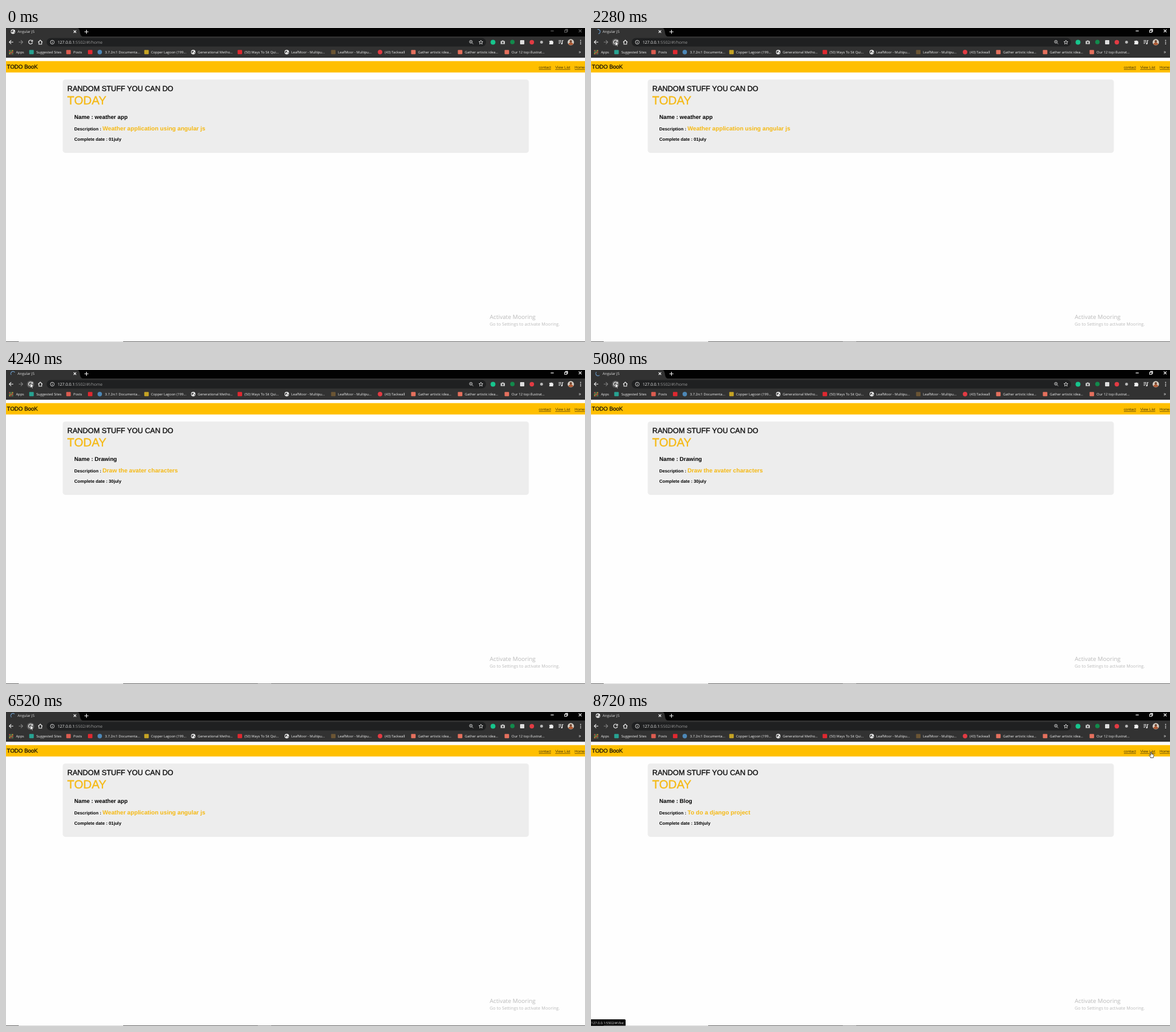
An HTML page for the animation above (8760 ms loop, 954 px wide and 518 px high).

```html
<!DOCTYPE html>
<html lang="en">
<head>
<meta charset="utf-8">
<style>
  html, body { margin: 0; width: 100%; height: 100%; overflow: hidden; background: #fefefe; }
  svg { display: block; width: 954px; height: 518px; }
  text { font-family: "Open Sans", "Noto Sans", sans-serif; text-rendering: geometricPrecision; white-space: pre; }
  .page text { font-family: "Liberation Sans", Arial, sans-serif; font-weight: bold; }
  .page .medium { font-weight: normal; stroke: currentColor; fill: currentColor; stroke-width: .35; }
  .page .link { font-weight: normal; font-size: 6.2px; fill: #40320a; text-decoration: underline .5px; }
  .line { fill: none; stroke: #eee; stroke-width: 1.1; }
</style>
</head>
<body>
<svg viewBox="0 0 954 518">
  <defs>
    <g id="globe">
      <circle r="3.7" fill="#eee"/>
      <path d="M-3-1 0-2.5 1-1-1 .4-1 2-2.6 1ZM1 .5 3 0 2 2.5Z" fill="#444"/>
    </g>
  </defs>

  <rect width="954" height="49" fill="#323232"/>
  <path d="M118 0Q121 0 122 8 123 14 127 14H954V0Z" fill="#020202"/>
  <rect x="67" y="16.5" width="724" height="14" rx="7" fill="#1f2021"/>
  <use id="favicon" href="#globe" x="11.5" y="6"/>
  <path id="spinner" class="line" d="M0-3.6A3.6 3.6 0 0 1 0 3.6" style="stroke:#6fa0cf"/>
  <text x="19" y="8.2" font-size="5.95" fill="#ddd">Angular JS</text>
  <path class="line" d="M111.5 4 115.5 8M115.5 4 111.5 8M132.5 3V9.5M129.2 6.2H135.8"/>
  <g id="controls" class="line"><path d="M897.5 4.9H902.5M943.7 2.5 948.3 7.1M948.3 2.5 943.7 7.1M920.5 3.7H924V7.2H920.5ZM922 3.5V2.4H925.4V5.8H924.2"/></g>

  <path class="line" d="M12 23.3H5.5M8.5 20.2 5.4 23.3 8.5 26.4"/>
  <path class="line" d="M21 23.3H27.5M24.5 20.2 27.6 23.3 24.5 26.4" style="stroke:#808080"/>
  <circle id="hover" cx="40.5" cy="23.4" r="6" fill="#5c5c5c"/>
  <path class="line" d="M43 21.2A3.2 3.2 0 1 0 43.6 24M43.8 19.8V22.3H41.2"/>
  <path class="line" d="M53 23.5 56.5 20 60 23.5M54.2 23V26.8H58.8V23"/>
  <g class="line" style="stroke-width:.8">
    <circle cx="76.3" cy="23.4" r="3.2"/><path d="M76.3 23V25.2M76.3 21.4V22.2"/>
    <circle cx="766" cy="22.7" r="2.3"/><path d="M767.7 24.4 769.8 26.5M765 22.7H767"/>
    <path d="M782.5 20 783.4 22.3 785.9 22.5 784 24.1 784.6 26.6 782.5 25.2 780.4 26.6 781 24.1 779.1 22.5 781.6 22.3Z"/>
  </g>
  <text x="85" y="25.8" font-size="6.65" fill="#eee">127.0.0.1<tspan fill="#9a9a9a">:5502/#!/home</tspan></text>

  <circle cx="802.4" cy="23.4" r="4" fill="#17c58d"/>
  <path d="M815 21.5H816.8L817.4 20.4H819.6L820.2 21.5H822V26.6H815Z" fill="#ccc"/>
  <circle cx="818.5" cy="24" r="1.4" fill="#444"/>
  <circle cx="834.4" cy="23.2" r="3.6" fill="#128a4c"/>
  <rect x="847" y="20" width="7" height="7" rx="1" fill="#ddd"/>
  <circle cx="866.4" cy="23.5" r="3.7" fill="#e23b43"/>
  <circle cx="882.4" cy="23.4" r="2.4" fill="#bbb"/>
  <path d="M895.2 21.2H897.2A1.3 1.3 0 0 1 899.6 21.2H901.4V23A1.3 1.3 0 0 1 901.4 25.2V27H895.2V25A1.2 1.2 0 0 0 895.2 23Z" fill="#eee"/>
  <path class="line" d="M910.5 20.7H915M910.5 23H915M910.5 25.3H913M916.6 26V20.7H918.4"/>
  <circle cx="915.7" cy="25.8" r="1.2" fill="#eee"/>
  <circle cx="930.6" cy="23.4" r="5.2" fill="#d9d2c8"/>
  <path d="M926.6 26.7Q927.2 23.8 930.6 23.8 934 23.8 934.6 26.7 930.6 30 926.6 26.7Z" fill="#b05b35"/>
  <circle cx="930.6" cy="22" r="2.1" fill="#70442f"/>
  <path d="M946.7 19.8V27.2" stroke="#eee" stroke-width="1.5" stroke-dasharray="1.5 1.4"/>
  <g id="bookmarks"></g>
  <text x="943.5" y="42" font-size="8" fill="#eee">»</text>

  <g class="page">
    <rect y="54.6" width="954" height="18.8" fill="#ffbf00"/>
    <text class="medium" x="1.5" y="67.3" font-size="9.1" color="#1c1607">TODO BooK</text>
    <text class="link" x="878" y="67">contact</text>
    <text class="link" x="905" y="67">View List</text>
    <text class="link" x="937" y="67">Home</text>
    <rect x="93.5" y="85" width="768" height="121" rx="4.5" fill="#ededed"/>
    <text class="medium" x="101" y="104" font-size="12.02" color="#0c0c0c">RANDOM STUFF YOU CAN DO</text>
    <text class="medium" x="100.8" y="125.8" font-size="19.3" color="#f5b914">TODAY</text>
    <text id="name" x="112.5" y="150" font-size="9.3"></text>
    <text x="112.5" y="169" font-size="7.25">Description :</text>
    <text id="about" x="159" y="169" font-size="9.72" fill="#f5b914"></text>
    <text id="due" x="112.5" y="185.6" font-size="7.3"></text>
  </g>
  <g fill="#bababa">
    <text x="797" y="480" font-size="9.6">Activate Mooring</text>
    <text x="797" y="490.6" font-size="7.2">Go to Settings to activate Mooring.</text>
  </g>
  <path d="M0 517.5H21M193 517.5H954" stroke="#6a6a6a"/>
  <path d="M21 517.5H193" stroke="#dcdcdc"/>
  <path id="taskItem" d="M415 517.5H437" stroke="#999"/>
  <g id="status">
    <path id="statusBox" fill="#050505"/>
    <text id="statusText" x=".3" y="514.6" font-size="5.5" fill="#e4e4e4"></text>
  </g>

  <g id="cursor">
    <path id="arrow" d="M0 0V8.2L1.9 6.5 3.1 9.2 4.4 8.6 3.2 6H5.8Z" fill="#fff" stroke="#111" stroke-width=".6"/>
    <path id="beam" d="M-1.4-3.7H1.4M0-3.7V3.7M-1.4 3.7H1.4" fill="none" stroke="#777" stroke-width=".7"/>
    <path id="hand" d="M-.8.6Q0-.6.8.6V3.8L4 4.7Q4.7 5 4.4 6.2L3.6 8.4V10H-1.2V8.6L-3.4 5.8Q-3.2 4.6-2 5.2L-.8 6.2Z" fill="#fff" stroke="#111" stroke-width=".7"/>
  </g>
</svg>
<script>
const LOOP = 8760;
const $ = id => document.getElementById(id);
const show = (id, on) => $(id).setAttribute("visibility", on ? "visible" : "hidden");

// [icon centre, icon kind, colour, label x, label]
const bookmarks = [
  [42, "square", "#27a392", 50, "Suggested Sites"],
  [103, "square", "#dc5c50", 111, "Posts"],
  [138.7, "square", "#df2830"],
  [154.5, "circle", "#4d87b6", 163, "3.7.2rc1 Documenta..."],
  [231.5, "square", "#c5a324", 239, "Copper Lagoon (199..."],
  [308.5, "globe", "", 316, "Generational Metho..."],
  [385.3, "square", "#df2830", 393, "(50) Ways To Sit Qui..."],
  [462.6, "globe", "", 470, "LeafMoor - Multipu..."],
  [539.3, "square", "#6b5534", 547, "LeafMoor - Multipu..."],
  [616.3, "circle", "#e23b43", 624, "(43) Tackwall"],
  [671.2, "square", "#e5705d", 679, "Gather artistic idea..."],
  [748.2, "square", "#e5705d", 756, "Gather artistic idea..."],
  [825.2, "square", "#e5705d", 833, "Our 12 top illustrat..."]
];
const label = (x, text) => `<text x="${x}" y="41.8" font-size="5.7" fill="#eee">${text}</text>`;
const icon = (x, kind, color) => ({
  square: `<rect x="${x - 3.7}" y="36.2" width="7.4" height="7" rx="1" fill="${color}"/>`,
  circle: `<circle cx="${x}" cy="39.7" r="3.7" fill="${color}"/>`,
  globe: `<use href="#globe" x="${x}" y="39.7"/>`
})[kind];

let markup = label(16.5, "Apps");
for (let i = 0; i < 9; i++) {
  const color = ["#d95748", "#57a65f", "#d9ab3b"][(i + (i / 3 | 0)) % 3];
  markup += `<rect x="${5 + i % 3 * 2.5}" y="${36.5 + (i / 3 | 0) * 2.5}" width="1.8" height="1.8" fill="${color}"/>`;
}
for (const [x, kind, color, textX, text] of bookmarks)
  markup += icon(x, kind, color) + (text ? label(textX, text) : "");
$("bookmarks").innerHTML = markup;

const weather = ["weather app", "Weather application using angular js", "01july"];
const drawing = ["Drawing", "Draw the avater characters", "30july"];
const blog = ["Blog", "To do a django project", "15thjuly"];
const tasks = [[0, weather], [2920, drawing], [5800, weather], [7000, blog]];
const loading = [[1440, 2920], [3640, 5800], [6120, 7000]];
const waiting = [[1480, 1680], [3680, 4080], [4560, 4760]];
const route = [[800, 60, 150], [1240, 40, 21.5], [7000, 40, 21.5], [7240, 684.5, 23.5],
               [7480, 860, 40], [7840, 922, 64], [8120, 923, 65.5]];
const within = (spans, t) => spans.some(([from, to]) => t >= from && t < to);

function cursorAt(t) {
  const i = route.findIndex(stop => stop[0] > t);
  if (i < 0) return route.at(-1).slice(1);
  const [t0, x0, y0] = route[Math.max(0, i - 1)], [t1, x1, y1] = route[i];
  const k = t1 > t0 ? Math.max(0, (t - t0) / (t1 - t0)) : 0;
  return [x0 + (x1 - x0) * k, y0 + (y1 - y0) * k];
}

function setStatus(text, width) {
  show("status", text);
  $("statusText").textContent = text;
  $("statusBox").setAttribute("d", `M0 507H${width - 1.5}Q${width} 507 ${width} 508.5V517.5H0Z`);
}

function draw(now) {
  const t = Math.floor(now % LOOP / 40) * 40;
  const [name, about, due] = tasks.findLast(task => task[0] <= t)[1];
  $("name").textContent = "Name : " + name;
  $("about").textContent = about;
  $("due").textContent = "Complete date : " + due;

  const busy = within(loading, t);
  show("favicon", !busy);
  show("spinner", busy);
  $("spinner").setAttribute("transform", `translate(11.5 6) rotate(${t * 360 / 1160 % 360})`);
  if (t >= 7960) setStatus("127.0.0.1:5502/#!/list", 57);
  else if (within(waiting, t)) setStatus("Waiting for cache...", 317);
  else setStatus("", 57);

  const active = t >= 1440;
  $("controls").setAttribute("opacity", active ? 1 : .4);
  show("taskItem", active);
  show("hover", t >= 1240 && t <= 7000);

  const [x, y] = cursorAt(t);
  const overLink = y > 57 && x > 904;
  const overAddress = y > 16 && y < 31 && x > 67 && x < 791;
  const visible = t >= 800;
  $("cursor").setAttribute("transform", `translate(${x} ${y})`);
  show("arrow", visible && !overLink && !overAddress);
  show("beam", visible && overAddress);
  show("hand", visible && overLink);
  requestAnimationFrame(() => draw(performance.now()));
}
draw(0);
</script>
</body>
</html>
```
